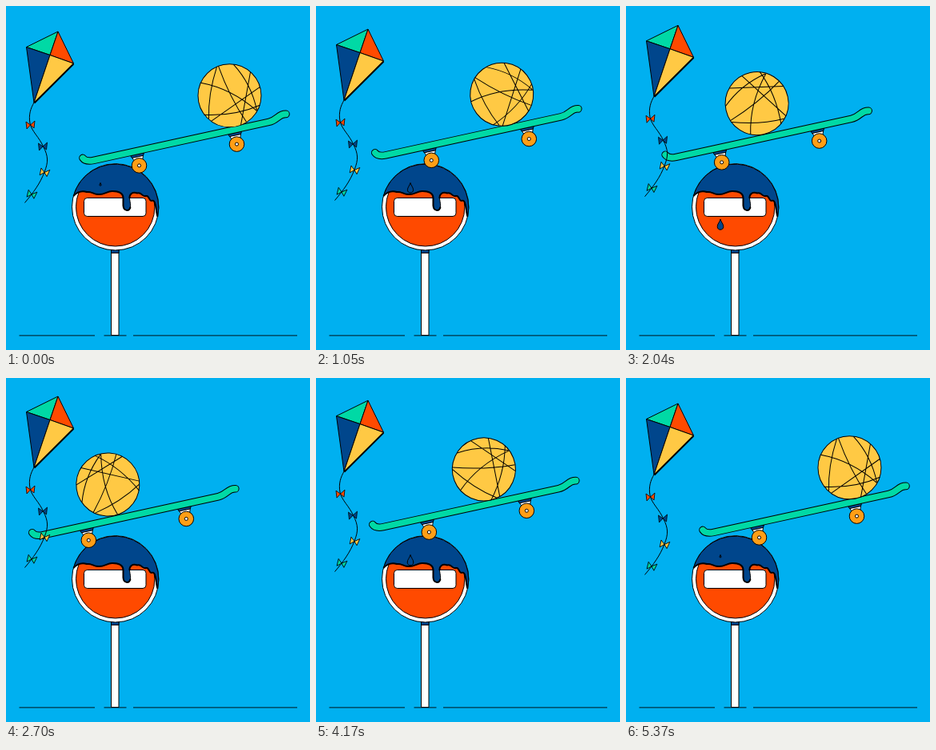
Animation, 380 px wide and 431 px high, one loop 5.4 s. Source, as an HTML page:

```html
<!DOCTYPE html>
<html lang="en">
<head>
<meta charset="utf-8">
<title>Balancing act</title>
<style>
html, body { margin: 0; width: 100%; height: 100%; overflow: hidden; background: #00b0f0; }
svg { display: block; width: 380px; height: 431px; stroke: #000; stroke-linejoin: round; }
.navy { fill: #00468c; }
.green { fill: #00d9a5; }
.red { fill: #ff4a00; }
.yellow { fill: #ffc944; }
.orange { fill: #ff9e16; }
.white { fill: #fff; }
.line { fill: none; }
</style>
</head>
<body>
<svg viewBox="0 0 380 431">
  <defs>
    <path id="bow" d="M0 0L-5.500-4-4.500 5ZL5.500-5 4.500 4Z"/>
    <g id="wheel">
      <path class="white" d="M-9-10L5-13 4-5-5-4Z"/>
      <path class="navy" d="M-11-12.500L6-16 5-12.500-9-9.500Z"/>
      <circle class="orange" r="9.300"/>
      <circle class="white" r="2"/>
    </g>
    <path id="deck" d="M-70.500-9.500Q-67-4.500-57-6.500L162-54.500C173-57 174-65 183.500-64.500"/>
  </defs>

  <path class="line" stroke-width=".9" d="M16.500 412.900H111M122.500 412.900H150.500M159 412.900H364"/>

  <!-- road sign with dripping paint -->
  <path class="white" d="M131.500 304H141V412.500H131.500Z"/>
  <path class="navy" d="M131.500 304H141V309.500H131.500Z"/>
  <circle class="white" cx="136.700" cy="251.800" r="54.200"/>
  <circle class="red" cx="136.700" cy="251.800" r="49.200"/>
  <rect class="white" x="97.500" y="240.500" width="77.500" height="23" rx="4"/>
  <path class="navy" d="M84.300 238A54.200 54.200 0 0 1 189.500 264C188 260 188 253 186.500 248C185 242 183 244 181.500 244C178 243 179 237 175 238C170 239.500 170 233 164 234.500C158 232 154 236 154.500 241C155 246 156 249 155.500 252C154 258 147 257 146.500 250V240C146 234 141 232 133 232C126 232 123 236.500 116 236C109 236.500 108 232 101 233C94 231 88 234 84.300 238Z"/>
  <path class="line" stroke-width="2" d="M189.500 264C188 260 188 253 186.500 248C185 242 183 244 181.500 244C178 243 179 237 175 238C170 239.500 170 233 164 234.500C158 232 154 236 154.500 241M155.500 252C154 258 147 257 146.500 250V240C146 234 141 232 133 232C126 232 123 236.500 116 236C109 236.500 108 232 101 233C94 231 88 234 84.300 238"/>
  <path id="drop" class="navy" d="M0 0C1 4 3.800 6 3.800 9.500C3.800 14.500-3.800 14.500-3.800 9.500C-3.800 6-1 4 0 0Z" vector-effect="non-scaling-stroke"/>

  <!-- skateboard, drawn around its front wheel -->
  <g id="board">
    <use href="#wheel"/>
    <use href="#wheel" x="122" y="-26.800"/>
    <g class="line" stroke-linecap="round">
      <use href="#deck" stroke-width="9.600"/>
      <use href="#deck" stroke-width="7.600" stroke="#00d9a5"/>
    </g>
  </g>

  <g id="ball">
    <circle class="yellow" r="39.500"/>
    <path class="line" d="M-32 24Q6 26 38 12M-36-16Q2-9 34 19M-16-36Q-27-2-26 29M-14-37Q0 2 21 33M5-39Q27-15 34 18M38-11L-23 32M26-29.500L14 37"/>
  </g>

  <g id="kite">
    <path class="line" d="M35 121C31 128 28 136 30 147C32 157 42 165 46.500 176C53 188 53 196 48 208C43 222 34 234 23.500 246.500"/>
    <g stroke-width=".8">
      <use href="#bow" class="red" x="30.500" y="149"/>
      <use href="#bow" class="navy" x="46" y="176"/>
      <use href="#bow" class="yellow" transform="translate(48 208.500) rotate(18)"/>
      <use href="#bow" class="green" transform="translate(32 236) rotate(20)"/>
    </g>
    <path class="green" d="M65 32L25.500 51.500 55 61.500Z"/>
    <path class="red" d="M65 32L84.500 72 55 61.500Z"/>
    <path class="navy" d="M25.500 51.500L55 61.500 35 121Z"/>
    <path class="yellow" d="M84.500 72L55 61.500 35 121Z"/>
    <path class="line" stroke-width="2" d="M84.500 72.500L35.500 121.500"/>
  </g>
</svg>
<script>
const LOOP = 5400;
const [board, ball, kite, drop] = ['board', 'ball', 'kite', 'drop'].map(id => document.getElementById(id));

// [time, x] keys of the front wheel, and of the ball relative to it
const wheelKeys = [[0, 166.5], [570, 154.5], [1050, 144.3], [1710, 129.3], [2040, 119.7], [2280, 113.3],
  [2700, 103.3], [3420, 121.5], [3660, 127.5], [3990, 137], [4170, 141.3], [4560, 153.3], [5130, 165.5]];
const ballKeys = [[0, 113], [1050, 88], [2040, 44], [2700, 24], [3660, 41], [4170, 68.5]];

// Smooth periodic curve through the keys
function curve(keys, t) {
  const n = keys.length;
  const key = i => {
    const k = keys[(i + n) % n];
    return [k[0] + Math.floor(i / n) * LOOP, k[1]];
  };
  let i = n - 1;
  while (keys[i][0] > t) i--;
  const [a, b, c, d] = [-1, 0, 1, 2].map(j => key(i + j));
  const span = c[0] - b[0], u = (t - b[0]) / span;
  const slope = (p, q) => (q[1] - p[1]) / (q[0] - p[0]);
  const tangent = (p, q, r) => slope(p, q) * slope(q, r) > 0 ? slope(p, r) * span : 0;
  const m = tangent(a, b, c), k = tangent(b, c, d), rise = c[1] - b[1];
  return b[1] + m * u + (3 * rise - 2 * m - k) * u * u + (m + k - 2 * rise) * u ** 3;
}

const move = (el, x, y, rest = '') => el.setAttribute('transform', `translate(${x} ${y}) ${rest}`);

function drawDrop(t) {
  // Time relative to the next release; two drops fall per loop.
  const release = t < 2300 ? 1793 : t < 5265 ? 4766 : 1793 + LOOP;
  const age = t - release;
  const size = Math.min(1, Math.max(0, (age + 2250) / 1600));
  const fall = age > 0 ? 7.4e-4 * age * age : 0;
  drop.style.display = size > 0.15 && fall < 178 ? '' : 'none';
  move(drop, 118, 221.5 + fall, `scale(${size})`);
}

function draw(now) {
  const t = now % LOOP;
  move(kite, 0, 4.5 * Math.cos(2 * Math.PI * t / LOOP) - 4.5);

  const x = curve(wheelKeys, t);
  const y = 193 + 0.0085 * (x - 138) ** 2;
  move(board, x, y);

  const dx = curve(ballKeys, t);
  const turn = (dx - 113) / 0.978 / 39.5 * 180 / Math.PI;
  move(ball, x + dx, y - 65 - 0.2 * dx, `rotate(${turn})`);

  drawDrop(t);
  requestAnimationFrame(() => draw(performance.now()));
}
draw(0);
</script>
</body>
</html>
```
